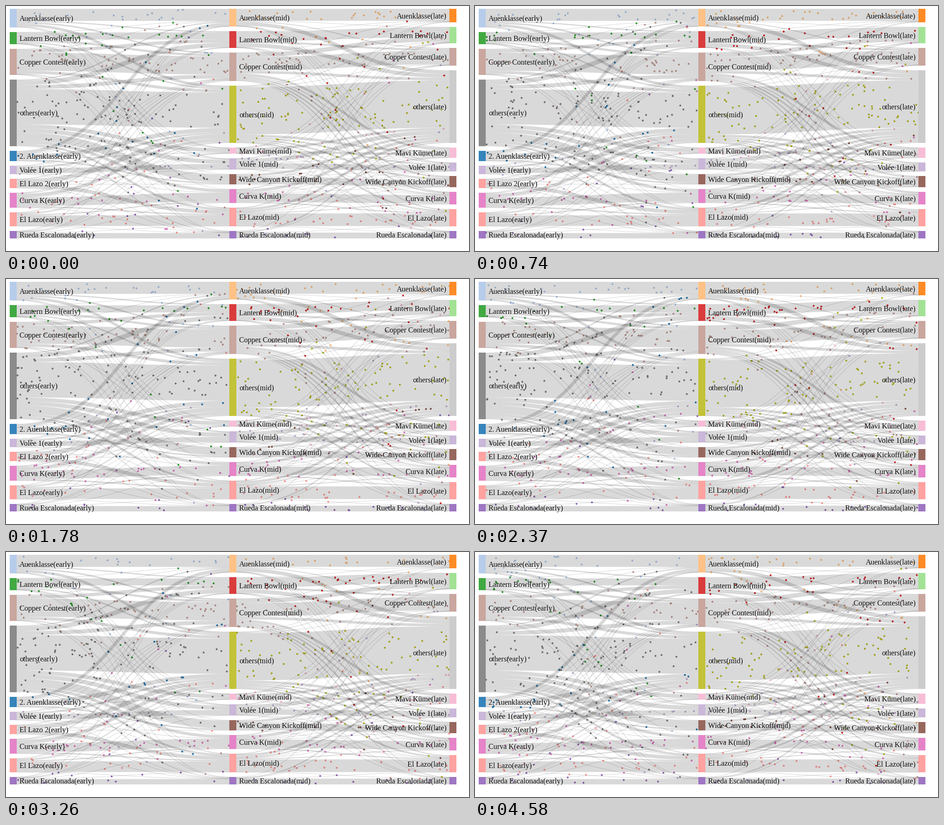
Write a matplotlib script that moves like this. It is 993 by 526 pixels and loops after 4600 ms.

```python
import numpy as np
import matplotlib.pyplot as plt
from matplotlib.animation import FuncAnimation
from matplotlib.collections import PathCollection
from matplotlib.path import Path

W, H, DPI = 993, 526, 72          # at 72 dpi one point is one pixel
LOOP, INTERVAL, STEP = 4600, 40, 147.7
FRAMES = LOOP // INTERVAL
TOP, GAP, NODE_W = 6, 10, 15
NODE_X = [8, 479, 951]
SPEED = 0.15                      # pixels per ms
SAMPLES = 160

rng = np.random.default_rng(12)

LEAGUES = ["Auenklasse", "Lantern Bowl", "Copper Contest", "others", "Mavi Küme",
           "Volée 1", "Wide Canyon Kickoff", "Curva K", "El Lazo", "Rueda Escalonada"]
NAMES = [LEAGUES[:4] + ["2. Auenklasse", "Volée 1", "El Lazo 2"] + LEAGUES[7:],
         LEAGUES, LEAGUES]
STAGES = ["early", "mid", "late"]

HEIGHTS = np.array([
    [40, 26, 56, 143, 22, 18, 20, 32, 30, 16],
    [38, 36, 61, 123, 13, 24, 22, 30, 40, 16],
    [29, 35, 38, 156, 22, 19, 24, 27, 37, 16]], float)

LOWER = ["#e377c2", "#ff9896", "#9467bd"]
COLORS = [
    ["#aec7e8", "#2ca02c", "#c49c94", "#7f7f7f", "#1f77b4", "#c5b0d5", "#ff9896"] + LOWER,
    ["#ffbb78", "#d62728", "#c49c94", "#bcbd22", "#f7b6d2", "#c5b0d5", "#8c564b"] + LOWER,
    ["#ff7f0e", "#98df8a", "#c49c94", "#c7c7c7", "#f7b6d2", "#c5b0d5", "#8c564b"] + LOWER]

# Main flows per source node: {target: approximate width}
FLOWS = [
    [{0: 27, 1: 2, 2: 3, 3: 5, 5: 1},
     {0: 1, 1: 14, 2: 5, 3: 3},
     {0: 1, 1: 6, 2: 38, 3: 6, 5: 1},
     {0: 3, 1: 9, 2: 9, 3: 81, 4: 7, 5: 8, 6: 13, 7: 6, 8: 5, 9: 1.5},
     {0: 7, 3: 8, 4: 1, 6: 2},
     {2: 1, 3: 4, 5: 9, 7: 1},
     {3: 9, 8: 8},
     {2: 2, 3: 7, 7: 17, 8: 3},
     {2: 1, 3: 2, 7: 2, 8: 23},
     {3: 1, 7: 1, 8: 1, 9: 12}],
    [{0: 24, 2: 1.5, 3: 7},
     {0: 1, 1: 18, 2: 4, 3: 9},
     {1: 8, 2: 29, 3: 6, 4: 5, 5: 2, 6: 4, 7: 3, 8: 2},
     {0: 1, 1: 1, 2: 1, 3: 103, 4: 5, 5: 3, 6: 4, 7: 2, 8: 3},
     {3: 6, 4: 5},
     {3: 8, 5: 11},
     {3: 4, 6: 14},
     {3: 6, 4: 1, 7: 17, 8: 2},
     {3: 6, 4: 3, 6: 1, 7: 2, 8: 26},
     {3: 3, 9: 12}]]


def node_tops(heights):
    return TOP + np.cumsum(heights + GAP) - heights - GAP


def flow_matrix(rows, out, into):
    """Main flows plus thin ones, balanced to the node heights."""
    m = 0.45 * (rng.random((10, 10)) < 0.55)
    for i, row in enumerate(rows):
        for j, width in row.items():
            m[i, j] = width
    for _ in range(60):
        m *= (out / m.sum(axis=1))[:, None]
        m *= into / m.sum(axis=0)
    return m


def even_points(x0, y0, x1, y1):
    """Points at equal arc length on the link's curve, and its length."""
    t = np.linspace(0, 1, 300)
    a, b = 3 * t * (1 - t) ** 2, 3 * t ** 2 * (1 - t)
    x = x0 * (1 - t) ** 3 + (x0 + x1) / 2 * (a + b) + x1 * t ** 3
    y = y0 + (y1 - y0) * (b + t ** 3)
    s = np.concatenate([[0], np.cumsum(np.hypot(np.diff(x), np.diff(y)))])
    u = np.linspace(0, s[-1], SAMPLES)
    return np.column_stack([np.interp(u, s, x), np.interp(u, s, y)]), s[-1]


paths, widths, tables, lengths, link_colors = [], [], [], [], []
for side in range(2):
    out, into = HEIGHTS[side], HEIGHTS[side + 1]
    m = flow_matrix(FLOWS[side], out, into)
    start = node_tops(out)[:, None] + np.cumsum(m, axis=1) - m / 2
    end = node_tops(into) + np.cumsum(m, axis=0) - m / 2
    x0, x1 = NODE_X[side] + NODE_W, NODE_X[side + 1]
    xm = (x0 + x1) / 2
    for i, j in np.argwhere(m > 0):
        y0, y1 = start[i, j], end[i, j]
        paths.append(Path([(x0, y0), (xm, y0), (xm, y1), (x1, y1)],
                          [Path.MOVETO] + [Path.CURVE4] * 3))
        points, length = even_points(x0, y0, x1, y1)
        tables.append(points)
        lengths.append(length)
        widths.append(m[i, j])
        link_colors.append(plt.matplotlib.colors.to_rgb(COLORS[side][i]))
widths, lengths = np.array(widths), np.array(lengths)
tables, link_colors = np.array(tables), np.array(link_colors)

# Particles: births spread over the loop and the time needed to fill the links
WARMUP = 7000
life = lengths / SPEED * np.log(3)
births = (0.78 * widths + 1.1) * (WARMUP + LOOP) / life
link = rng.permutation(np.repeat(np.arange(len(widths)), rng.poisson(births)))
n = len(link)
born = np.sort(rng.uniform(-WARMUP, LOOP, n))
speed = SPEED * rng.uniform(0.5, 1.5, n)
offset = (rng.random(n) - 0.5) * (widths[link] - 4)

fig = plt.figure(figsize=(W / DPI, H / DPI), dpi=DPI, facecolor="white")
ax = fig.add_axes([0, 0, 1, 1])
ax.axis("off")

dots = ax.scatter([], [], s=16, linewidths=0, zorder=1)
ax.add_collection(PathCollection(
    paths, facecolors="none", edgecolors=[(0, 0, 0, 0.15)],
    linewidths=np.maximum(1, widths), capstyle="butt", zorder=2), autolim=False)

for col, x in enumerate(NODE_X):
    tops = node_tops(HEIGHTS[col])
    ax.bar([x] * 10, HEIGHTS[col], NODE_W, tops, align="edge",
           color=COLORS[col], alpha=0.9, linewidth=0, zorder=3)
    tx, ha = (x - 6, "right") if col == 2 else (x + NODE_W + 6, "left")
    for name, mid in zip(NAMES[col], tops + HEIGHTS[col] / 2):
        label = f"{name}({STAGES[col]})"
        for dy, color in ((1, "white"), (0, "black")):
            ax.text(tx, mid + 5.6 + dy, label, ha=ha, va="baseline", color=color,
                    family="Liberation Serif", size=16, zorder=5 - dy)

ax.set_xlim(0, W)
ax.set_ylim(H, 0)


def update(frame):
    now = int((frame * INTERVAL + INTERVAL / 2) / STEP) * STEP
    gone = (now - born) * speed
    live = (gone >= 0) & (gone < lengths[link])
    k = link[live]
    pos = gone[live] / lengths[k] * (SAMPLES - 1)
    i = np.minimum(pos.astype(int), SAMPLES - 2)
    f = (pos - i)[:, None]
    xy = tables[k, i] * (1 - f) + tables[k, i + 1] * f
    xy[:, 1] += offset[live]
    dots.set_offsets(xy)
    dots.set_facecolors(link_colors[k])
    return dots,


anim = FuncAnimation(fig, update, frames=FRAMES, interval=INTERVAL,
                     repeat=True, repeat_delay=0, blit=False)
plt.show()
```
